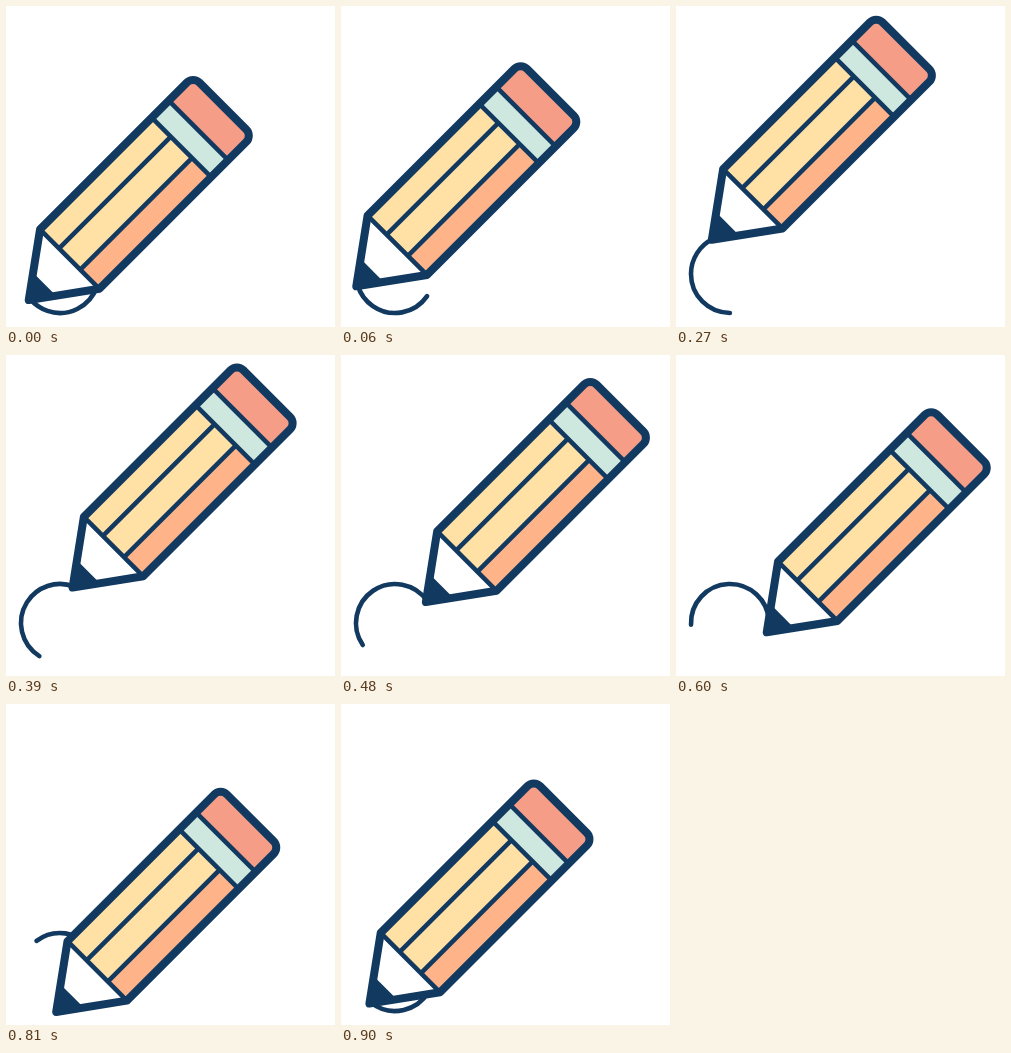
Recreate the animation shown at these times as an HTML page. Size 329 by 321 pixels, loop 930 ms.

```html
<!DOCTYPE html>
<html lang="en">
<head>
<meta charset="utf-8">
<title>Drawing pencil</title>
<style>
  html, body { margin: 0; width: 100%; height: 100%; overflow: hidden; background: #fff; }
  svg { display: block; width: 329px; height: 321px; }
  .line { fill: none; stroke: #12395f; stroke-width: 4.6; }
  .outline { stroke-width: 8; stroke-linejoin: round; }
</style>
</head>
<body>
<svg viewBox="0 0 329 321">
  <circle id="trail" class="line" r="39" pathLength="360" stroke-linecap="round"/>
  <!-- Pencil lies along the x axis with its tip at the origin -->
  <g id="pencil">
    <path fill="#f59d87" d="M58-42H265.5a9 9 0 0 1 9 9V33a9 9 0 0 1-9 9H58z"/>
    <path fill="#cee8e0" d="M216-42h24v84h-24z"/>
    <path fill="#ffe0a5" d="M58-42h158v84H58z"/>
    <path fill="#ffb388" d="M58 15h158v27H58z"/>
    <path fill="#fff" d="M0 0 58-42v84z"/>
    <path fill="#12395f" d="M0 0 22.5-16.3v32.6z"/>
    <path class="line" d="M58-42v84M216-42v84M240-42v84M58-15h158M58 15h158"/>
    <path class="line outline" d="M0 0 58-42H265.5a9 9 0 0 1 9 9V33a9 9 0 0 1-9 9H58z"/>
  </g>
</svg>
<script>
  const LOOP = 930, RADIUS = 39;
  const trail = document.getElementById('trail');
  const pencil = document.getElementById('pencil');

  function draw() {
    const p = performance.now() % LOOP / LOOP;
    const head = 139.6 + 360 * p;
    const tail = 18.5 + 246 * p; // the tail's jump at the seam is hidden by the pencil
    const a = head * Math.PI / 180;
    const x = 52.6 + RADIUS * Math.cos(a);
    const y = 269 + RADIUS * Math.sin(a);
    pencil.setAttribute('transform', `translate(${x} ${y}) rotate(-45)`);
    trail.setAttribute('transform', `translate(54 268) rotate(${tail})`);
    trail.setAttribute('stroke-dasharray', `${head - tail} 360`);
    requestAnimationFrame(draw);
  }
  draw();
</script>
</body>
</html>
```
